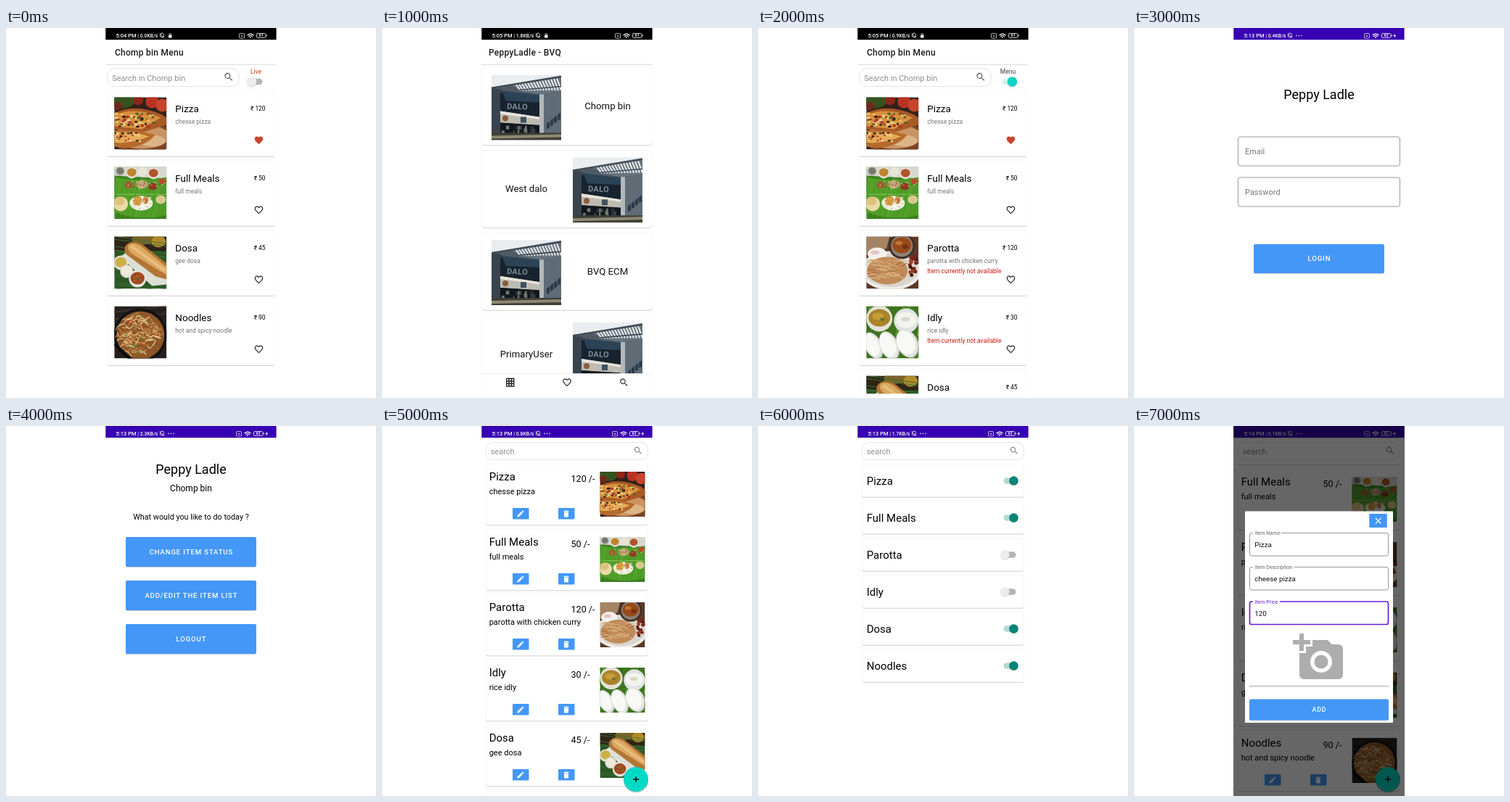
Animation, 510 px wide and 510 px high, one loop 8 s. Source, as an HTML page:

```html
<!DOCTYPE html>
<html lang="en">
<head>
<meta charset="utf-8">
<title>Food ordering app</title>
<style>
html, body { margin: 0; width: 100%; height: 100%; overflow: hidden; background: #fff; }
svg { display: block; width: 100vw; height: 100vh; font-family: Roboto, sans-serif; }
</style>
</head>
<body>
<svg id="stage" viewBox="0 0 510 510"></svg>
<script>
const SHOP = 'Chomp bin', APP = 'Peppy Ladle';
const BLUE = '#4497f7';

// Basic shapes
const rect = (x, y, w, h, fill, r = 0, more = '') =>
  `<rect x="${x}" y="${y}" width="${w}" height="${h}" rx="${r}" fill="${fill}" ${more}/>`;
const disc = (x, y, r, fill, more = '') => `<circle cx="${x}" cy="${y}" r="${r}" fill="${fill}" ${more}/>`;
const oval = (x, y, rx, ry, fill, more = '') =>
  `<ellipse cx="${x}" cy="${y}" rx="${rx}" ry="${ry}" fill="${fill}" ${more}/>`;
const path = (d, fill, more = '') => `<path d="${d}" fill="${fill}" ${more}/>`;
const line = (d, stroke, w = 1, more = '') => path(d, 'none', `stroke="${stroke}" stroke-width="${w}" ${more}`);
const text = (x, y, s, size, fill = '#111', more = '') =>
  `<text x="${x}" y="${y}" font-size="${size}" fill="${fill}" ${more}>${s}</text>`;
const mid = 'text-anchor="middle"', end = 'text-anchor="end"', medium = 'font-weight="500"';
const turn = (a, x, y) => `transform="rotate(${a} ${x} ${y})"`;
const use = (id, x, y, k = 1) => `<use href="#${id}" transform="translate(${x} ${y}) scale(${k})"/>`;
const icon = (d, x, y, size, fill) =>
  `<g transform="translate(${x - size / 2} ${y - size / 2}) scale(${size / 24})">${path(d, fill)}</g>`;

const HEART = 'M12 21.3l-1.5-1.3C5.4 15.4 2 12.3 2 8.5 2 5.4 4.4 3 7.5 3c1.7 0 3.4.8 4.5 2.1C13.1 3.8 14.8 3 16.5 3 19.6 3 22 5.4 22 8.5c0 3.8-3.4 6.9-8.5 11.5z';
const HEART_LINE = HEART + 'M12 18.7C16.8 14.4 20 11.5 20 8.5 20 6.5 18.5 5 16.5 5c-1.5 0-3 1-3.6 2.4h-1.8C10.5 6 9 5 7.5 5 5.5 5 4 6.5 4 8.5c0 3 3.2 5.9 8 10.2z';
const FIND = 'M15.5 14h-.8l-.3-.3A6.5 6.5 0 1 0 13.7 14.4l.3.3v.8l5 5 1.5-1.5zM9.5 14a4.5 4.5 0 1 1 0-9 4.5 4.5 0 0 1 0 9z';
const PHOTO = 'M3 4V1h2v3h3v2H5v3H3V6H0V4zM6 10V7h3V4h7l1.8 2H21a2 2 0 0 1 2 2v12a2 2 0 0 1-2 2H5a2 2 0 0 1-2-2V10zM13 19a5 5 0 0 0 0-10 5 5 0 0 0 0 10zM9.8 14a3.2 3.2 0 1 0 6.4 0 3.2 3.2 0 1 0-6.4 0z';
const PENCIL = 'M3 17.2V21h3.8L17.8 9.9l-3.7-3.7zM20.7 7a1 1 0 0 0 0-1.4l-2.3-2.3a1 1 0 0 0-1.4 0l-1.9 1.9 3.7 3.7z';
const BIN = 'M6 19a2 2 0 0 0 2 2h8a2 2 0 0 0 2-2V7H6zM19 4h-3.5l-1-1h-5l-1 1H5v2h14z';

function random(seed) {
  return () => (seed = (seed * 16807) % 2147483647) / 2147483647;
}
function scatter(seed, n, draw) {
  const r = random(seed);
  return Array.from({ length: n }, () => draw(r)).join('');
}
const pick = (r, list) => list[Math.floor(r() * list.length)];

// Food pictures, 72 by 72
const bowl = (x, y, r, fill, rim = '#e4e2da') => disc(x, y, r, rim) + oval(x, y - .5, r * .8, r * .72, fill);
const cake = (x, y, rx, ry, a) => oval(x + 1, y + 1.5, rx, ry, '#b9bfb8', turn(a, x, y)) + oval(x, y, rx, ry, '#e3e5e1', turn(a, x, y)) +
  oval(x - 1, y - 1, rx * .85, ry * .85, '#f8f8f6', turn(a, x, y));

const food = {
  pizza: () => rect(0, 0, 72, 72, '#33211a') + oval(12, 5, 16, 10, '#35531f') +
    disc(33, 4, 7, '#8f2418') + disc(52, 6, 9, '#b93222') + disc(66, 11, 9, '#c8432b') + oval(4, 12, 7, 6, '#6d2a1b') +
    oval(40, 56, 44, 22, '#7a4527') + oval(38, 54, 38, 17, '#c99362') + oval(52, 60, 18, 8, '#dcb486') +
    path('M0 22Q28 8 66 24Q76 30 72 38L40 48 0 44z', '#a85a25') + path('M0 25Q28 12 64 28L38 44 0 40z', '#d9903c') +
    path('M0 46L30 45 56 52Q44 68 14 70L0 68z', '#b56a2c') + path('M0 48L28 48 48 54Q30 62 6 63L0 62z', '#e3ac58') +
    scatter(31, 70, r => oval(r() * 54 + 2, r() * 19 + 22, 1.2 + r() * 1.8, .9 + r(), pick(r, ['#2b1b16', '#a83220', '#f5dfa4', '#4f6128', '#e9bb68']))) +
    scatter(8, 24, r => oval(r() * 36 + 2, r() * 12 + 49, 1.6, 1.2, pick(r, ['#3a2119', '#b94528', '#f5dc98']))),

  meals: () => rect(0, 0, 72, 72, '#3a7f20') + path('M0 0H72V16L0 12z', '#d5d9cd') +
    path('M0 14Q36 22 72 14V66Q36 76 0 62z', '#4f9d28') + line('M0 38H72', '#86c053', 1.4) +
    scatter(17, 26, r => line(`M${r() * 80} 15l-8 54`, pick(r, ['#418a22', '#60ad38']), .7)) +
    bowl(8, 6, 6, '#77776f', '#a5a59e') + bowl(24, 8, 8, '#c08430') + bowl(39, 7, 7, '#eae4d2') + bowl(54, 9, 8, '#b0562a') +
    oval(20, 25, 6, 5, '#9d6433') + oval(38, 24, 8, 6, '#c2a67a') + oval(53, 27, 6, 5, '#8c3a22') + oval(66, 20, 5, 4, '#b54a2b') +
    oval(9, 51, 10, 10, '#ead9a6') + oval(7, 47, 7, 6, '#dcc27f') + oval(37, 50, 16, 10, '#f1efe4') +
    oval(32, 47, 6, 7, '#cf9330') + oval(43, 46, 4, 5, '#bf752c') + oval(64, 45, 7, 6, '#d9c88f') +
    scatter(5, 60, r => disc(22 + r() * 30, 42 + r() * 17, .8, pick(r, ['#fff', '#d9d6c8', '#c7963f']))) +
    scatter(6, 40, r => disc(15 + r() * 55, 20 + r() * 10, .8, pick(r, ['#e2cf9c', '#7a3a1f', '#b9803d']))),

  parotta: () => rect(0, 0, 72, 72, '#5a3a26') + path('M0 0H32L28 16 0 26z', '#a58466') +
    oval(34, 47, 42, 27, '#efedea') + oval(34, 46, 38, 24, '#dad5ce') + disc(49, 13, 18, '#3f2f28') + disc(49, 13, 15, '#8d8075') +
    oval(49, 12, 13, 11, '#97491a') + oval(45, 9, 5, 3, '#c07430') + oval(54, 14, 4, 3, '#713011') +
    oval(15, 24, 13, 9, '#f3f0ec') + oval(12, 22, 6, 3, '#dfc6c2') + oval(29, 47, 28, 19, '#c08b58') +
    scatter(44, 40, r => {
      const x = 8 + r() * 40, y = 33 + r() * 24;
      return line(`M${x - 7} ${y}q8 ${r() * 14 - 7} 15 ${r() * 6 - 3}`, pick(r, ['#dcb183', '#a36a3d', '#cfa06c']), 1.2);
    }) +
    scatter(3, 20, r => disc(60 + r() * 11, 28 + r() * 28, 2.5, pick(r, ['#72261a', '#4a1a11', '#994128']))),

  idly: () => rect(0, 0, 72, 72, '#3f7420') + scatter(12, 22, r => line(`M${r() * 90} 0l-18 72`, pick(r, ['#5c9a30', '#376a1c']), 1.5)) +
    disc(18, 17, 18, '#e4e2d8') + oval(18, 16, 15, 12, '#a98428') + oval(16, 14, 8, 5, '#c79d3a') + oval(22, 18, 3, 2, '#66702a') +
    disc(55, 20, 17, '#dfe3e4') + oval(55, 19, 14, 11, '#f3f3ee') + oval(54, 18, 6, 3, '#d3d8ca') +
    cake(9, 54, 11, 19, -25) + cake(31, 54, 12, 20, -22) + cake(56, 51, 14, 20, -22),

  dosa: () => rect(0, 0, 72, 72, '#2c5626') + path('M0 0H72V20H0z', '#2f2418') + oval(41, 4, 17, 7, '#7d6328') + oval(61, 7, 10, 8, '#b08a2a') +
    scatter(21, 14, r => line(`M0 ${r() * 72}l72 10`, '#3c6f31', 1)) +
    path('M8 28L20 19 72 46V66L52 68z', '#dddfd5') +
    path('M17 11Q25 4 39 11L72 37V59L57 55 17 25Q11 17 17 11z', '#b37636') +
    path('M20 11Q27 7 38 14L72 42V53L23 23Q16 16 20 11z', '#dba75e') + line('M23 13L70 47', '#e8bd82', 4) +
    bowl(9, 36, 10, '#cbb04a') + bowl(17, 48, 9, '#efead8') + bowl(32, 58, 12, '#a0481f') +
    scatter(9, 14, r => disc(26 + r() * 12, 53 + r() * 9, 1, pick(r, ['#c76c30', '#5c6e2d']))),

  noodles: () => rect(0, 0, 72, 72, '#25201e') + line('M0 8L72 0M0 18L72 10', '#39302b', 2) + disc(36, 40, 37, '#141313') +
    disc(36, 40, 33, '#8d5528') +
    scatter(77, 130, r => {
      const a = r() * 6.283, k = Math.sqrt(r()) * 28, x = 36 + k * Math.cos(a), y = 39 + k * Math.sin(a);
      return line(`M${x - 7} ${y + r() * 10 - 5}q${r() * 8} ${r() * 20 - 10} ${8 + r() * 5} ${r() * 12 - 6}`, pick(r, ['#deb877', '#c38d4c', '#ebcf9a', '#9c6330']), 1.1);
    }) +
    scatter(50, 34, r => {
      const a = r() * 6.283, k = Math.sqrt(r()) * 27;
      return oval(36 + k * Math.cos(a), 39 + k * Math.sin(a), 2, 1.1, pick(r, ['#a93a20', '#5d8130', '#c65a30']));
    }) + line('M0 52L22 72', '#0d0d0d', 4)
};

// Campus entrance, 96 by 90
function building() {
  let s = rect(0, 0, 96, 90, '#e9edf0') + path('M0 17L30 12 96 1V90H0z', '#4f5a65');
  s += path('M28 14L96 3V23L68 27 42 23z', '#68737c');
  for (let i = 0; i < 15; i++) s += line(`M${34 + i * 4} ${14 - i * .65}l6 ${8 + i * .6}`, '#e8edf0', 2);
  s += line('M0 18L96 3M38 21L96 16', '#3e4852', 1.6);
  s += path('M0 18L14 20V84H0z', '#3a444e') + path('M12 24L66 28V84H12z', '#17232e') + path('M14 22L66 28V38L20 36z', '#2c4356');
  s += text(21, 47, 'DALO', 11, '#7d8b97', 'font-weight="700" letter-spacing=".3" transform="rotate(2 21 47)"');
  s += path('M12 50L78 60V70L12 66z', '#bdbbb2') + path('M12 50L78 60V63L12 54z', '#e6e4dc') + disc(19, 60, 4, '#8a5c3c');
  s += rect(40, 58, 8, 8, '#41505f') + path('M12 66L67 70V84H12z', '#12181d');
  s += scatter(14, 16, r => rect(14 + r() * 48, 70 + r() * 8, 2 + r() * 3, 5, pick(r, ['#3c4a4e', '#72796f', '#2b3239'])));
  s += path('M72 27L96 23V84H72z', '#5f6b75') + path('M66 27L72 27V84H66z', '#b3b8ba');
  for (let i = 0; i < 4; i++) s += path(`M${76 + i * 5} ${67 - i * 4}l4-3v9l-4 2z`, '#2b3a4b');
  return s + path('M0 80L96 80V90H0z', '#3f3e38') + path('M0 84L96 82V86L0 88z', '#8f8972');
}

// Interface parts
function status(time, speed, bg, charge) {
  const dx = charge ? -4 : 0;
  let s = rect(137.3, 0, 235.3, 16.2, bg) +
    text(151.5, 13, `${time} PM<tspan font-size="6.9"> | ${speed}KB/s</tspan>`, 7.5, '#fff', medium);
  s += line('M212.5 12h5v-2.500a2.5 2.5 0 0 0-5 0zM211.5 7.500l7 6.500M214.5 13.500h1.500', '#ddd', .9);
  s += charge ? [224, 227.5, 231].map(x => disc(x, 10.5, .8, '#fff')).join('')
    : rect(224, 9.5, 4.5, 4, '#fff', .5) + line('M225 9.5V8.5a1.3 1.3 0 0 1 2.500 0v1', '#fff', .8);
  s += `<g transform="translate(${dx} 0)">` + rect(321.5, 7.5, 7, 6.5, 'none', 1, 'stroke="#ddd" stroke-width=".8"') +
    line('M323.8 9.5l2.5 2.5m0-2.5l-2.5 2.5', '#ddd', .8) +
    line('M333 9.8q4-3.5 8 0M334.6 11.5q2.4-2 4.8 0', '#fff', 1.2, 'stroke-linecap="round"') + disc(337, 13, .9, '#fff') +
    rect(345.5, 7.5, 12.5, 6, 'none', 1.5, 'stroke="#ddd" stroke-width=".9"') + rect(358.7, 9.2, 1, 2.6, '#ddd') +
    text(351.7, 12.4, charge ? 62 : 61, 5, '#fff', mid + ' font-weight="700"') + '</g>';
  return s + (charge ? path('M360 7.5l-2.8 3.6h2l-.7 3 2.8-3.8h-2z', '#fff') : '');
}

const card = (x, y, w, h, r = 3) =>
  rect(x, y, w, h + 1.5, '#dadada', r) + rect(x, y, w, h, '#fff', r, 'stroke="#f4f4f4" stroke-width=".7"');

const searchBox = (x, y, w, h, hint) =>
  rect(x, y, w, h, '#fff', 9, 'stroke="#e2e2e2" stroke-width=".9"') + text(x + 6.2, y + 16.6, hint, 11, '#909090');

function toggle(x, y, on, track, thumb, r = 6.2) {
  const tx = on ? x + 6 : x - 6;
  return rect(x - 8, y - 4.3, 17, 8.6, on ? track : '#b5b5b5', 4.3) +
    disc(tx, y + .8, r + .2, '#000', 'opacity=".15"') + disc(tx, y, r, on ? thumb : '#ececec');
}

const button = (x, y, w, h, label, size = 9.6) =>
  rect(x, y + 1, w, h, '#c9ced4', 2) + rect(x, y, w, h, BLUE, 2) +
  text(x + w / 2 + .4, y + h / 2 + size * .36, label, size, '#fff', `${mid} ${medium} letter-spacing=".089em"`);

const titleBar = (x, s) => line('M137 50.5H373', '#e4e4e4', 1.5) + text(x, 38, s, 12, '#1c1c1c', medium + ' letter-spacing=".25"');

const items = {
  pizza: ['Pizza', 'chesse pizza', 120], meals: ['Full Meals', 'full meals', 50],
  parotta: ['Parotta', 'parotta with chicken curry', 120], idly: ['Idly', 'rice idly', 30],
  dosa: ['Dosa', 'gee dosa', 45], noodles: ['Noodles', 'hot and spicy noodle', 90]
};
const soldOut = ['parotta', 'idly'];

// Screens
function menu(time, speed, ids, all) {
  let s = '';
  ids.forEach((id, i) => {
    const y = 86 + i * 96, [name, note, price] = items[id];
    s += card(140, y, 230, 90.5, 1.5) + use(id, 149.3, y + 9.4) + text(233.3, y + 29.7, name, 13.5, '#000') +
      text(233.3, y + 45.5, note, 8.5, '#757575') + text(357.5, y + 27.7, '₹ ' + price, 8.4, '#000', end);
    if (soldOut.includes(id)) s += text(233.3, y + 60, 'Item currently not available', 8.53, '#c9170c');
    s += icon(id === 'pizza' ? HEART : HEART_LINE, 348.5, y + 68.8, 14, id === 'pizza' ? '#cb4331' : '#222');
  });
  s += rect(137, 504, 236, 6, '#fff') + titleBar(150, SHOP + ' Menu');
  s += searchBox(140, 56, 181, 24.5, 'Search in ' + SHOP) + icon(FIND, 307, 67.5, 15, '#555');
  s += text(344.5, 63, all ? 'Menu' : 'Live', 8.5, all ? '#444' : '#cf3a0c', mid);
  return s + toggle(344.5, 74, all, '#d3f3f0', '#0fd3c2', 6.8) + status(time, speed, '#000');
}

function shops() {
  let s = '';
  [SHOP, 'West dalo', 'BVQ ECM', 'PrimaryUser'].forEach((name, i) => {
    const y = 54.5 + i * 113.8, odd = i % 2;
    s += card(137, y, 236, 106.5, 5) + use('building', odd ? 263 : 151, y + 10) +
      text(odd ? 199 : 311, y + 57.7, name, 13.2, '#111', mid);
  });
  s += rect(137, 476, 236, 34, '#fff') + line('M137 476.5H373', '#f0f0f0') + titleBar(147, 'PeppyLadle - BVQ');
  s += rect(171, 482.5, 11.5, 12, '#222');
  for (let i = 0; i < 9; i++) s += rect(172.2 + i % 3 * 3.5, 484 + Math.floor(i / 3) * 3.5, 2, 2, '#fff');
  return s + icon(HEART_LINE, 255, 488.5, 14, '#222') + icon(FIND, 333.5, 488.5, 14, '#222') + status('5:05', '1.8', '#000');
}

const hello = y => text(255, y, APP, 18, '#000', mid);

const login = () => hello(98) +
  ['Email', 'Password'].map((s, i) => rect(143.5, 150 + i * 56, 223, 40, '#fff', 3, 'stroke="#9a9a9a"') +
    text(153, 174 + i * 56, s, 11, '#777')).join('') +
  button(165, 298, 180, 40, 'LOGIN') + status('5:13', '0.4', '#3700b3', 1);

const home = () => hello(66) + text(255, 90, SHOP, 12, '#000', mid) +
  text(255, 128.8, 'What would you like to do today ?', 10.8, '#000', mid) +
  ['CHANGE ITEM STATUS', 'ADD/EDIT THE ITEM LIST', 'LOGOUT'].map((s, i) => button(165, 153 + i * 60, 180, 41, s)).join('') +
  status('5:13', '2.3', '#3700b3', 1);

const search = () => rect(137, 16, 236, 36, '#fff') + searchBox(143.5, 22.5, 223, 24, 'search') + icon(FIND, 353, 34, 14, '#8a8a8a');

const availability = () => search() + Object.keys(items).map((id, i) => {
  const y = 52.5 + i * 51;
  return card(143.5, y, 223, 45, 3.5) + text(149.7, y + 28.7, items[id][0], 15, '#000') +
    toggle(346.5, y + 23, !soldOut.includes(id), '#b4d9d5', '#078577');
}).join('') + status('5:13', '1.7', '#3700b3', 1);

function editor(top, time, speed) {
  let s = '';
  Object.keys(items).forEach((id, i) => {
    const y = top + i * 90, [name, note, price] = items[id];
    s += card(143.5, y, 223, 84) + text(147.7, y + 23.3, name, 15, '#000') + text(147.7, y + 42, note, 11, '#000') +
      text(260.5, y + 25, price + ' /-', 12.6, '#000') + use(id, 300.5, y + 11, 62 / 72);
    [[180, PENCIL], [243, BIN]].forEach(([x, d]) => { s += rect(x, y + 61, 22.5, 15.5, BLUE, 1) + icon(d, x + 11, y + 69, 12, '#fff'); });
  });
  return s + search() + disc(350, 488.5, 17, '#000', 'opacity=".2"') + disc(350, 487, 17, '#03dac5') +
    line('M346 487h8M350 483v8', '#000', 1.3) + status(time, speed, '#3700b3', 1);
}

function field(y, label, value, w, active) {
  const c = active ? '#6a1fd0' : '#666';
  return rect(159.5, y, 191, 31.5, '#fff', 2.5, `stroke="${active ? c : '#8c8c8c'}" stroke-width="${active ? 1.7 : .9}"`) +
    rect(164, y - 2, w, 4, '#fff') + text(166.3, y + 2.8, label, 7.1, c) + text(166.3, y + 19.5, value, 9.8, '#111');
}

// The list behind the dialog is scrolled to its end
const dialog = () => editor(-31, '5:14', '0.1') + rect(137, 0, 236, 510, '#000', 0, 'opacity=".6"') +
  rect(153, 117.5, 204, 291.5, '#fff', 1) + rect(324.3, 121, 24.5, 19, BLUE, 1) + line('M333 127l7.5 7.5m0-7.5l-7.5 7.5', '#fff', 1.2) +
  field(147.5, 'Item Name', 'Pizza', 39) + field(194.5, 'Item Description', 'cheese pizza', 57) + field(242, 'Item Price', '120', 37, true) +
  `<g transform="translate(219 283) scale(3)">${path(PHOTO, '#adadad')}</g>` +
  rect(159, 357.5, 192, 2.3, '#d2d2d2') + button(159, 376.5, 192, 29, 'ADD', 8.8);

const picture = (id, w, h, body) => `<clipPath id="${id}Clip"><rect width="${w}" height="${h}"/></clipPath><g id="${id}" clip-path="url(#${id}Clip)">${body}</g>`;

const screens = [
  menu('5:04', '0.0', ['pizza', 'meals', 'dosa', 'noodles'], false),
  shops(),
  menu('5:05', '0.9', ['pizza', 'meals', 'parotta', 'idly', 'dosa'], true),
  login(),
  home(),
  editor(52, '5:13', '0.8'),
  availability(),
  dialog()
];

const stage = document.getElementById('stage');
stage.innerHTML = '<defs>' + Object.keys(food).map(id => picture(id, 72, 72, food[id]())).join('') +
  picture('building', 96, 90, building()) + '</defs>' + rect(0, 0, 510, 510, '#fff') +
  screens.map(s => `<g class="screen" fill-rule="evenodd" display="none">${s}</g>`).join('');

const groups = [...stage.querySelectorAll('.screen')];
const start = performance.now();
let shown = -1;

function render(ms) {
  const now = Math.floor(ms % 8000 / 1000);
  if (now === shown) return;
  groups.forEach((g, i) => g.setAttribute('display', i === now ? 'inline' : 'none'));
  shown = now;
}
function tick() {
  render(performance.now() - start);
  requestAnimationFrame(tick);
}
tick();
</script>
</body>
</html>
```
